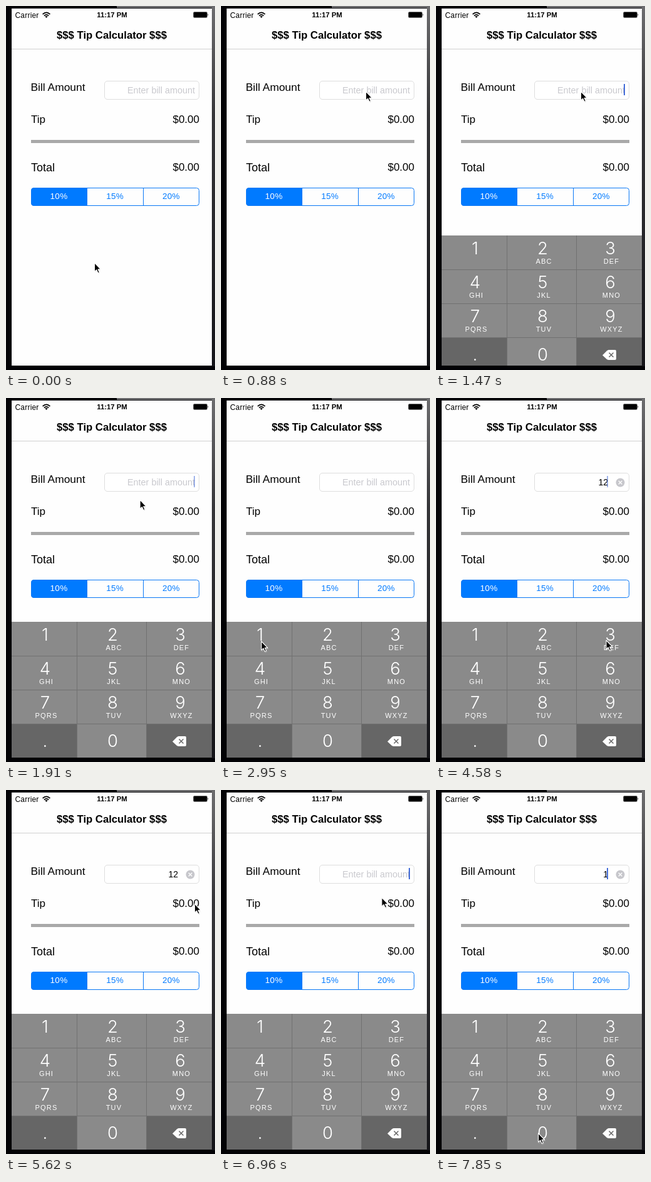
Animation, 334 px wide and 579 px high, one loop 8 s. Source, as an HTML page:

```html
<!DOCTYPE html>
<html lang="en">
<head>
<meta charset="utf-8">
<title>Tip Calculator</title>
<style>
  html, body { margin: 0; width: 100%; height: 100%; overflow: hidden; background: #000; }
  svg { display: block; width: 334px; height: 579px; }
  text { font-family: "Liberation Sans", Arial, sans-serif; white-space: pre; }
  .digit { font-family: Inter, Roboto, sans-serif; font-weight: 300; }
</style>
</head>
<body>
<svg id="stage" viewBox="0 0 334 579" xmlns="http://www.w3.org/2000/svg">
  <defs>
    <linearGradient id="edge" x1="0" y1="0" x2="0" y2="1">
      <stop offset="0" stop-color="#6c6c6e"/>
      <stop offset=".3" stop-color="#353538"/>
      <stop offset="1" stop-color="#141418"/>
    </linearGradient>
    <clipPath id="screen"><rect x="9" y="4" width="320" height="568"/></clipPath>
  </defs>
  <rect width="334" height="579" fill="#020205"/>
  <rect x="177" width="157" height="3" fill="#6c6c6e"/>
  <rect x="329" y="3" width="5" height="570" fill="url(#edge)"/>
  <rect x="9" y="4" width="320" height="568" fill="#fefefe"/>
  <rect x="9" y="68" width="320" height="1" fill="#cfcfcf"/>

  <path d="M58.6 13.2Q64.5 7.6 70.4 13.2M60.9 15.6Q64.5 12.2 68.1 15.6"
    fill="none" stroke="#000" stroke-width="1.8"/>
  <path d="M62.4 16.7L64.5 19L66.6 16.7Q64.5 15 62.4 16.7Z"/>
  <rect x="299.5" y="9.5" width="22" height="9" rx="1.5" fill="none" stroke="#777"/>
  <rect x="300" y="10" width="21" height="8" rx="1"/>
  <path d="M322.5 12q1.8 2 0 4z"/>

  <rect x="40" y="213" width="269" height="5" fill="#a9a9a9"/>
  <rect x="157.5" y="119.5" width="151" height="29" rx="4.5" fill="#fff" stroke="#dedede"/>
  <g id="labels"></g>

  <g fill="none" stroke="#0a78f5">
    <path d="M129.5 289.5H44.5a4 4 0 0 0-4 4V313.5a4 4 0 0 0 4 4H129.5Z" fill="#007aff"/>
    <rect x="40.5" y="289.5" width="268" height="28" rx="4"/>
    <path d="M219.5 290V317"/>
  </g>
  <g id="segments"></g>

  <g id="clear">
    <circle cx="294.5" cy="134.5" r="7" fill="#c7c7cc"/>
    <path d="M291.7 131.7l5.6 5.6m0-5.6l-5.6 5.6" stroke="#fff" stroke-width="1.3"/>
  </g>
  <rect id="caret" y="124" width="2" height="18" fill="#426bd8"/>

  <g clip-path="url(#screen)"><g id="keyboard"></g></g>

  <g id="cursor" stroke-width="1.1" stroke-linejoin="round">
    <use href="#arrow" x=".8" y="1.5" opacity=".25"/>
    <path id="arrow" d="M0 0V14L3.2 11.2L5.6 16.3L7.9 15.3L5.6 10.4H10Z" stroke="#fff"/>
  </g>
</svg>
<script>
const $ = id => document.getElementById(id);

function set(el, attrs) {
  for (const name in attrs) el.setAttribute(name, attrs[name]);
  return el;
}

function add(parent, tag, attrs, content = '') {
  const el = set(document.createElementNS('http://www.w3.org/2000/svg', tag), attrs);
  el.textContent = content;
  $(parent).appendChild(el);
  return el;
}

const label = (parent, content, x, y, size, attrs = {}) =>
  add(parent, 'text', { x, y, 'font-size': size, ...attrs }, content);

const middle = { 'text-anchor': 'middle' };
const end = { 'text-anchor': 'end' };
const bold = { ...middle, 'font-weight': 700 };

label('labels', 'Carrier', 14.5, 18.5, 12, { 'letter-spacing': .2 });
label('labels', '11:17 PM', 169.5, 18, 11.3, bold);
label('labels', '$$$ Tip Calculator $$$', 169, 52, 16.7, bold);
label('labels', 'Bill Amount', 39.5, 135, 17.4);
label('labels', 'Tip', 40, 186, 17);
label('labels', '$0.00', 309, 186, 17, end);
label('labels', 'Total', 40, 263, 18);
label('labels', '$0.00', 309, 262, 17, end);
const placeholder = label('labels', 'Enter bill amount', 302, 139, 14.4, { ...end, fill: '#c9c9ce' });
const amount = label('labels', '', 275, 139, 14, end);

['10%', '15%', '20%'].forEach((name, i) =>
  label('segments', name, 84.5 + i * 89.7, 307, 13.5,
    { ...middle, fill: i ? '#007aff' : '#fff', 'letter-spacing': .3 }));

// Number pad
const KEY = '#8a8a8a', DARK = '#666', ROW = 54, TOP = 356;
const edges = [9, 113, 224, 329];
const letters = ['', 'ABC', 'DEF', 'GHI', 'JKL', 'MNO', 'PQRS', 'TUV', 'WXYZ'];
const keys = {};

[...'123456789.0<'].forEach((name, i) => {
  const col = i % 3, y = TOP + Math.floor(i / 3) * ROW;
  const cx = 62.5 + col * 108, white = { ...middle, fill: '#fff' };
  keys[name] = add('keyboard', 'rect', {
    x: edges[col], y, width: edges[col + 1] - edges[col], height: ROW,
    fill: '.<'.includes(name) ? DARK : KEY
  });
  if (name === '<') return;
  label('keyboard', name, cx, y + (i < 9 ? 30 : 37), 27.5, { ...white, class: 'digit' });
  if (letters[i]) label('keyboard', letters[i], cx + 2, y + 45, 11, { ...white, 'letter-spacing': 1.2 });
});
add('keyboard', 'path', {
  d: 'M9 410.5H329M9 464.5H329M9 518.5H329M113.5 356V572M224.5 356V572',
  stroke: '#707070', fill: 'none'
});
add('keyboard', 'path', {
  d: 'M266 546.5L273 539.5Q274.5 538 276 538H286Q288 538 288 540V552Q288 554 286 554H276Q274.5 554 273 553Z',
  fill: '#fff'
});
add('keyboard', 'path', { d: 'M276.5 542.5l7 7m0-7l-7 7', stroke: DARK, 'stroke-width': 1.5 });

// The picture advances in ticks.
const LOOP = 8000, TICK = 148, LEAD = 18;

const moves = [
  { from: 0, to: 6, x: 231.5, y: 136 },      // bill field
  { from: 12, to: 17, x: 64.5, y: 387 },     // key 1
  { from: 23, to: 26, x: 159, y: 392 },      // key 2
  { from: 27, to: 30, x: 272, y: 385.5 },
  { from: 35, to: 38, x: 301.5, y: 181 },
  { from: 38, to: 42, x: 292.5, y: 132 },    // clear button
  { from: 46, to: 50, x: 64.5, y: 382 },     // key 1
  { from: 51, to: 53, x: 163.5, y: 546 }     // key 0
];

const edits = [
  { at: 9, value: '' },
  { at: 23, value: '1' },
  { at: 27, value: '12' },
  { at: 44, value: '' },
  { at: 51, value: '1' }
];

function pointer(n) {
  let x = 141.5, y = 408.5;
  for (const move of moves) {
    const k = Math.min(1, Math.max(0, (n - move.from) / (move.to - move.from)));
    const eased = k * k * (3 - 2 * k);
    x += (move.x - x) * eased;
    y += (move.y - y) * eased;
  }
  return [x, y];
}

// Blinks: three ticks on, one fading, two off; every edit restarts it.
function caretOpacity(age) {
  const phase = (age + 5) % 6;
  return age < 1 || phase < 3 ? 1 : phase === 3 ? .5 : 0;
}

function render(time) {
  const n = Math.floor((time % LOOP + LEAD) / TICK);
  $('cursor').setAttribute('transform', `translate(${pointer(n)})`);

  const edit = edits.filter(e => e.at <= n).pop();
  const value = edit ? edit.value : '';
  amount.textContent = value;
  placeholder.setAttribute('opacity', value ? 0 : 1);
  $('clear').setAttribute('opacity', value ? 1 : 0);
  set($('caret'), { x: value ? 273 : 300, opacity: edit ? caretOpacity(n - edit.at) : 0 });

  // Critically damped spring
  const u = Math.max(0, (n - 8.16) * 2.69);
  const drop = Math.round(4 * ROW * (1 + u) * Math.exp(-u));
  set($('keyboard'), { transform: `translate(0 ${drop})`, visibility: edit ? 'visible' : 'hidden' });

  // A key is held during the tick before its digit appears.
  const next = edits.find(e => e.at === n + 1);
  const held = next ? next.value.slice(-1) : '';
  for (const name of '12') keys[name].setAttribute('fill', name === held ? DARK : KEY);
}

const start = performance.now();
function loop() {
  render(performance.now() - start);
  requestAnimationFrame(loop);
}
loop();
</script>
</body>
</html>
```
